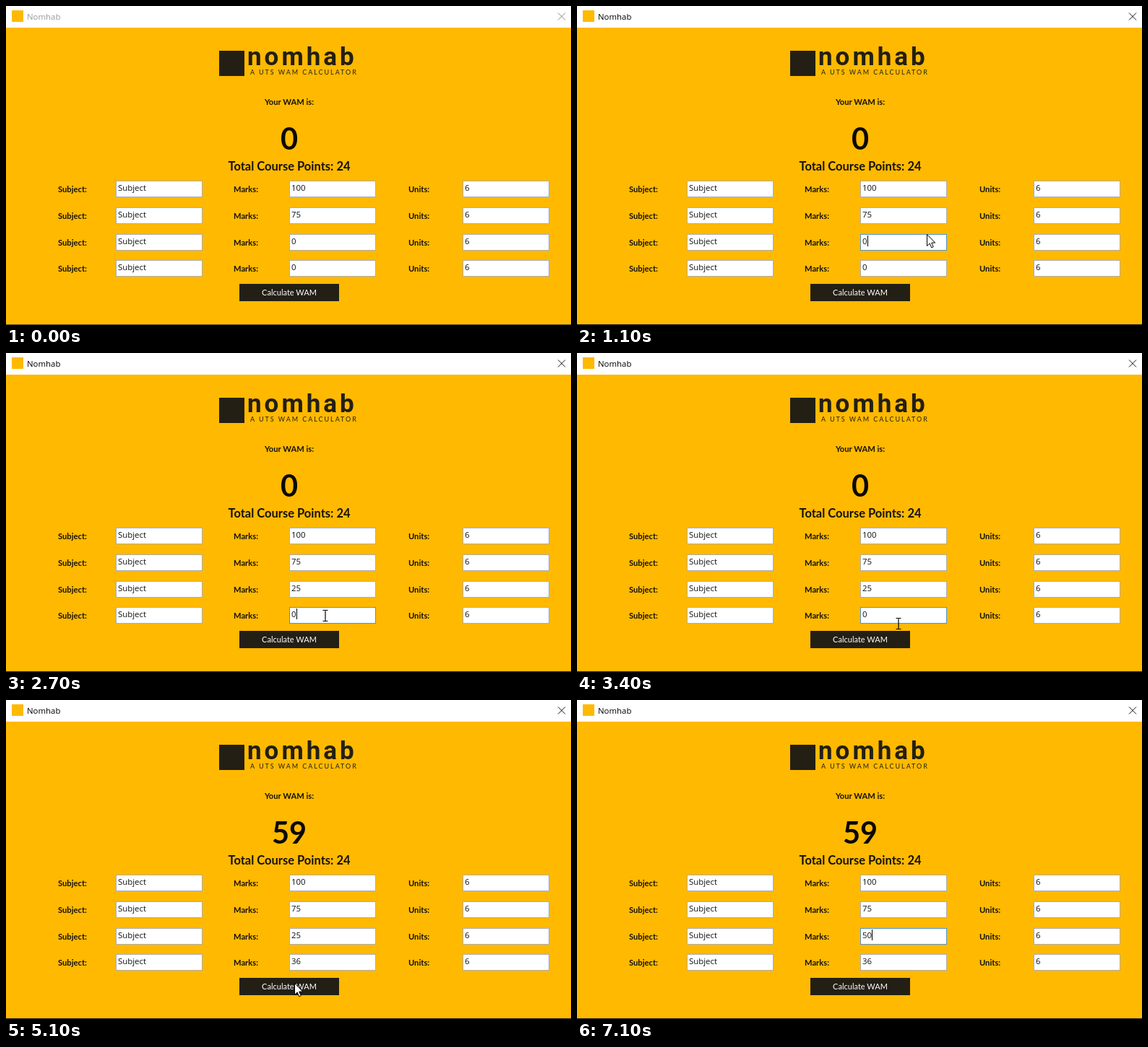
An HTML page for the animation above (7200 ms loop, 782x442 px).

```html
<!DOCTYPE html>
<html lang="en">
<head>
<meta charset="utf-8">
<title>Nomhab</title>
<style>
  html, body { margin: 0; width: 100%; height: 100%; overflow: hidden; background: #ffb900; }
  svg { display: block; width: 782px; height: 442px; }
  text { white-space: pre; fill: #14110a; }
  .ui { font: 11.4px "Open Sans", "Noto Sans", sans-serif; fill: #111; }
  .label { font: 700 11.2px Lato, "Open Sans", sans-serif; }
  .mid { text-anchor: middle; }
  .total { font: 700 16.5px Lato, "Open Sans", sans-serif; }
  .score { font: 700 41.5px Lato, "Open Sans", sans-serif; fill: #0b0904; }
  .button { font: 11px Lato, "Open Sans", sans-serif; fill: #fff; }
  .word { font: 700 35px Roboto, Inter, sans-serif; letter-spacing: 4px; fill: #231f14; }
  .tag { font: 9px Lato, "Open Sans", sans-serif; letter-spacing: 1.95px; fill: #231f14; }
  .field { fill: #fff; stroke: #abadb3; }
  .field.focus { stroke: #4f93d2; }
</style>
</head>
<body>
<svg viewBox="0 0 782 442">
  <rect width="782" height="442" fill="#ffb900"/>
  <rect width="782" height="30" fill="#fff"/>
  <rect x="8" y="6" width="16" height="16" fill="#ffb900"/>
  <text id="title" class="ui" x="29" y="19">Nomhab</text>
  <path id="close" d="M764 9.5l10 10m0-10l-10 10" fill="none"/>
  <rect id="edge" y="441" width="782" height="1"/>

  <rect x="295" y="62" width="35" height="35" fill="#231f14"/>
  <text class="word" x="334" y="82">nomhab</text>
  <text class="tag" x="338" y="94.5">A UTS WAM CALCULATOR</text>

  <text class="label mid" x="392" y="137">Your WAM is:</text>
  <text id="score" class="score mid" x="392" y="199">0</text>
  <text class="total mid" x="392" y="228">Total Course Points: 24</text>

  <g id="form"></g>
  <rect x="323" y="385" width="138" height="24" fill="#231f14"/>
  <text class="button mid" x="392" y="401">Calculate WAM</text>

  <rect id="caret" width="1" height="15" fill="#000"/>
  <path id="arrow" d="M.5 .5v16l3.7-3.5 2.5 5.8 2.5-1.1-2.5-5.6h5z" fill="#fff" stroke="#000"/>
  <path id="beam" d="M-3.5 -7.5h3l.5 .5l.5-.5h3M-3.5 7.5h3l.5-.5l.5 .5h3M0 -7v14" fill="none" stroke="#000" stroke-width="1.2"/>
</svg>
<script>
const LOOP = 7200, STEP = 100, BLINK = 530;
const $ = id => document.getElementById(id);
const rows = [242, 279, 316, 352];
const columns = [
  { label: "Subject:", lx: 72, x: 152, values: ["Subject", "Subject", "Subject", "Subject"] },
  { label: "Marks:", lx: 315, x: 392, values: ["100", "75", "0", "0"] },
  { label: "Units:", lx: 557, x: 632, values: ["6", "6", "6", "6"] }
];

$("form").innerHTML = columns.map((c, i) => rows.map((y, r) => `
  <text class="label" x="${c.lx}" y="${y + 16}">${c.label}</text>
  <rect id="box${i}${r}" class="field" x="${c.x + .5}" y="${y + .5}" width="119" height="22"/>
  <text id="val${i}${r}" class="ui" x="${c.x + 3}" y="${y + 14}">${c.values[r]}</text>`
).join("")).join("");

// Clicks and key presses: time, focused row (-1 for none), its new text
const edits = [
  [700, 2, "0"], [1600, 2, ""], [1800, 2, "2"], [2000, 2, "25"],
  [2700, 3, "0"], [3600, 3, ""], [3800, 3, "3"], [4000, 3, "36"],
  [4800, -1], [5600, 2, "25"], [6200, 2, "2"], [6400, 2, ""],
  [6600, 2, "5"], [6800, 2, "50"]
];
const scoreAt = 4800;

// Pointer stops: time, x, y
const stops = [
  [100, 520, 436], [600, 448, 328], [800, 450, 328], [1100, 484, 316],
  [1800, 484, 316], [2100, 493, 313], [2300, 493, 313], [2600, 442, 364],
  [2900, 442, 364], [3300, 445, 375], [4100, 445, 375], [4400, 394, 427],
  [4700, 392, 400], [5000, 392, 400], [5500, 455, 327], [LOOP, 455, 327]
];
const hidden = [[0, 100], [3600, 4100], [6200, LOOP]];

function pointerAt(t) {
  const i = Math.max(1, stops.findIndex(s => s[0] > t));
  const [t0, x0, y0] = stops[i - 1], [t1, x1, y1] = stops[i];
  const p = Math.max(0, (t - t0) / (t1 - t0));
  const k = p * p * (3 - 2 * p);
  return [Math.round(x0 + (x1 - x0) * k), Math.round(y0 + (y1 - y0) * k)];
}

const overField = (x, y) =>
  columns.some(c => x > c.x && x < c.x + 120) && rows.some(r => y > r && y <= r + 23);

const show = (el, on) => el.setAttribute("visibility", on ? "visible" : "hidden");

function draw(t) {
  const done = edits.filter(e => e[0] <= t);
  const last = done[done.length - 1];
  const focus = last ? last[1] : -1;
  const marks = columns[1].values.slice();
  done.forEach(([, row, text]) => { if (row >= 0) marks[row] = text; });
  marks.forEach((m, r) => {
    $("val1" + r).textContent = m;
    $("box1" + r).classList.toggle("focus", r === focus);
  });

  const active = done.length > 0;
  $("title").style.fill = active ? "#000" : "#999";
  $("close").setAttribute("stroke", active ? "#111" : "#888");
  $("edge").setAttribute("fill", active ? "#1c1a14" : "#5c4a2c");
  $("score").textContent = t < scoreAt ? "0" : "59";

  const blinkOn = focus >= 0 && Math.floor((t - last[0]) / BLINK) % 2 === 0;
  show($("caret"), blinkOn);
  if (blinkOn) {
    const w = marks[focus] ? $("val1" + focus).getComputedTextLength() : 0;
    $("caret").setAttribute("x", Math.round(395 + w));
    $("caret").setAttribute("y", rows[focus] + 2);
  }

  const [x, y] = pointerAt(t);
  const seen = !hidden.some(([a, b]) => t >= a && t < b);
  const beam = overField(x, y);
  show($("arrow"), seen && !beam);
  show($("beam"), seen && beam);
  $(beam ? "beam" : "arrow").setAttribute("transform", `translate(${x} ${y})`);
}

const start = performance.now();
function tick() {
  const t = (performance.now() - start) % LOOP;
  draw(Math.floor(t / STEP) * STEP);
  requestAnimationFrame(tick);
}
tick();
</script>
</body>
</html>
```
